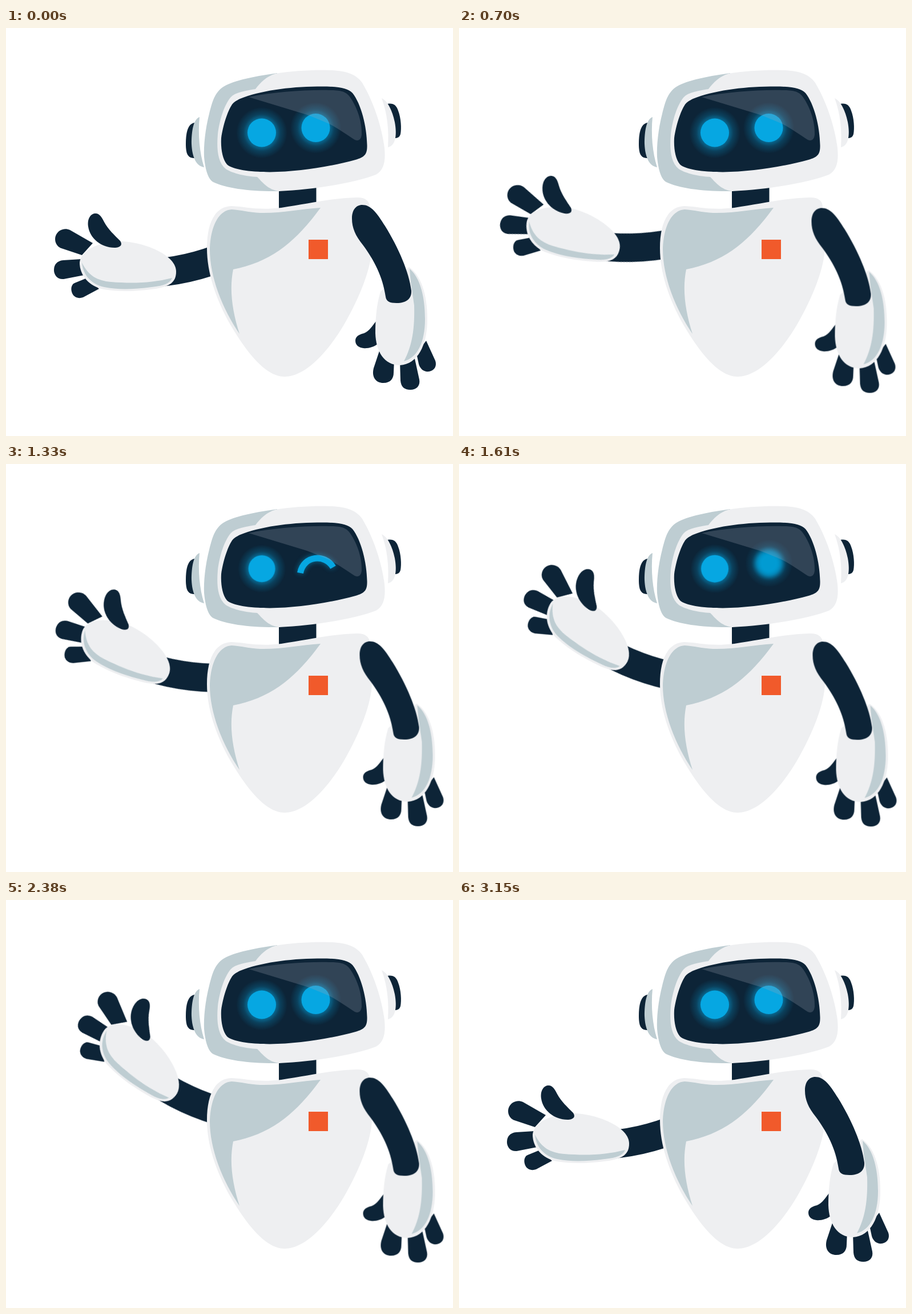
An HTML page without scripts that plays this animation: 783 px wide and 715 px high, repeating every 3220 ms.

```html
<!DOCTYPE html>
<html lang="en">
<head>
<meta charset="utf-8">
<title>Waving robot</title>
<style>
  html, body { margin: 0; width: 100%; height: 100%; overflow: hidden; background: #fff; }
  svg { display: block; width: 100vw; height: 100vh; }

  .dark { fill: #0d2437; }
  .light { fill: #eeeff1; }
  .grey { fill: #becdd2; }
  .glow { fill: url(#glow); }
  .eye { fill: #06a7e2; }
  .limb { fill: none; stroke: #0d2437; stroke-width: 50; }
  .smile { fill: none; stroke: #06a7e2; stroke-width: 11; }

  .wave, .sway, .open, .blur, .wink, .squint {
    animation: 3220ms -5ms infinite step-end;
  }
  .wave { animation-name: wave; transform-origin: 405px 418px; }
  .sway { animation-name: sway; }
  .open { animation-name: open; }
  .blur { animation-name: blur; }
  .wink { animation-name: wink; }
  .squint { animation-name: squint; transform-origin: 448px 183.5px; }

  /* the clock ticks every 70 ms: 46 ticks per loop */
  @keyframes wave {
    0% { transform: translate(0, 0) rotate(0deg); }
    15.217% { transform: translate(0, 0) rotate(0deg); animation-timing-function: steps(3); }
    21.739% { transform: translate(-17px, -18px) rotate(11.5deg); animation-timing-function: steps(3); }
    28.261% { transform: translate(-17px, -18px) rotate(29deg); animation-timing-function: steps(2); }
    32.609% { transform: translate(-17px, -18px) rotate(37.5deg); animation-timing-function: steps(4); }
    41.304% { transform: translate(-17px, -18px) rotate(22deg); animation-timing-function: steps(4); }
    50% { transform: translate(-17px, -18px) rotate(33.3deg); }
    52.174% { transform: translate(-17px, -18px) rotate(37.5deg); animation-timing-function: steps(4); }
    60.87% { transform: translate(-17px, -18px) rotate(21.9deg); animation-timing-function: steps(2); }
    65.217% { transform: translate(-17px, -18px) rotate(10deg); animation-timing-function: steps(4); }
    73.913% { transform: translate(-17px, -18px) rotate(37.5deg); animation-timing-function: steps(2); }
    78.261% { transform: translate(-17px, -18px) rotate(30deg); animation-timing-function: steps(3); }
    84.783% { transform: translate(-17px, -18px) rotate(10deg); animation-timing-function: steps(6); }
    97.826%, 100% { transform: translate(0, 0) rotate(0deg); }
  }
  @keyframes sway {
    0% { transform: translate(0, 0); }
    15.217% { transform: translate(0, 0); animation-timing-function: steps(3); }
    21.739% { transform: translate(11.5px, 5.5px); animation-timing-function: steps(5); }
    32.609% { transform: translate(13.5px, .3px); animation-timing-function: steps(8); }
    50% { transform: translate(13.5px, 1.3px); }
    78.261% { transform: translate(13.5px, 1.3px); animation-timing-function: steps(3); }
    84.783% { transform: translate(12px, 6px); animation-timing-function: steps(6); }
    97.826%, 100% { transform: translate(0, 0); }
  }
  @keyframes open {
    0%, 52.174%, 100% { opacity: 1; }
    26.087% { opacity: 0; }
  }
  @keyframes blur {
    0%, 28.261%, 52.174%, 100% { opacity: 0; }
    26.087%, 50% { opacity: 1; }
  }
  @keyframes wink {
    0%, 50%, 100% { opacity: 0; }
    28.261% { opacity: 1; }
  }
  @keyframes squint {
    0%, 52.174%, 100% { transform: scale(1); }
    26.087% { transform: scale(.94); }
    50% { transform: scale(.96); }
  }
</style>
</head>
<body>
<svg viewBox="0 0 783 715" preserveAspectRatio="none">
  <defs>
    <radialGradient id="glow">
      <stop offset=".5" stop-color="#06a7e2" stop-opacity=".6"/>
      <stop offset=".72" stop-color="#06a7e2" stop-opacity=".22"/>
      <stop offset="1" stop-color="#06a7e2" stop-opacity="0"/>
    </radialGradient>
    <filter id="soft" x="-50%" y="-50%" width="200%" height="200%">
      <feGaussianBlur stdDeviation="5"/>
    </filter>
  </defs>

  <!-- waving arm -->
  <g class="wave">
    <path class="limb" d="M260 429Q335 424 410 388"/>
    <path class="dark" d="M112 354L152 377L133 398L97 386C86 382 84 369 88 362C93 353 103 350 112 354Z"/>
    <path class="dark" d="M100 407L132 405L137 433L101 440C90 441 84 433 84 424C84 414 90 408 100 407Z"/>
    <path class="dark" d="M120 447L142 438L163 457L135 472C127 475 119 472 116 465C113 458 114 450 120 447Z"/>
    <path class="light" d="M129 411C131 390 160 374 205 374C248 377 298 399 298 427C298 446 286 453 262 457C235 461 200 463 171 458C146 453 129 434 129 411Z"/>
    <path class="grey" d="M133 411C144 434 160 443 184 445C222 448 256 447 291 438C288 447 276 452 255 454C225 458 195 459 172 454C150 449 135 434 133 411Z"/>
    <path class="dark" d="M144 348C142 333 149 325 157 325C164 325 168 332 172 340C179 353 190 363 200 373C204 379 202 384 192 385C168 386 147 369 144 348Z"/>
  </g>

  <!-- neck and body -->
  <path class="dark" d="M478 278H543.500V318H478Z"/>
  <path class="light" d="M352 386C352 345 364 313 395 312C420 313 440 320 482 315C530 308 570 298 615 297C630 297 637 303 637 314L641 385C640 420 620 472 592 520C565 566 525 611 488 611C452 611 418 562 393 520C367 474 352 428 352 386Z"/>
  <path class="grey" d="M551 315C515 317 482 325 445 324C425 323 412 319 395 318C370 320 358 352 357 388C357 436 379 492 409 536C396 495 391 458 398 423C465 410 508 374 551 315Z"/>
  <path fill="#f15a2b" d="M530 371H564V405H530Z"/>

  <!-- ears -->
  <path class="dark" d="M331 166C319 167 315 182 315 203C315 220 318 228 330 228Z"/>
  <path class="grey" d="M339 156C328 160 325 181 325 203C326 226 333 242 347 244C339 218 336 187 339 156Z"/>
  <path class="dark" d="M668 133C678 131 684 135 687 145C692 158 693 176 691 186C689 192 686 193 680 193Z"/>
  <path class="light" d="M658 123C668 127 677 145 681 165C685 187 683 206 669 209C671 179 668 150 658 123Z"/>

  <!-- head -->
  <path class="grey" d="M475 79C440 84 407 90 386 100C366 110 362 127 356 150C349 177 346 206 347 226C349 246 353 264 363 270C385 281 430 287 480 286Z"/>
  <path class="light" d="M472 80C500 75 540 73 567 74C598 75 614 82 624 96C643 128 658 171 663 210C665 232 663 248 648 257C615 270 545 283 478 286C459 283 451 272 440 261C421 260 397 255 385 247C370 235 369 210 371 186C374 161 382 136 393 122C402 112 420 110 437 107C446 95 456 85 472 80Z"/>
  <path class="dark" d="M410 124C445 110 495 103 545 102.500C582 102 598 105 607 114C622 133 632 172 632.500 205C633 222 628 226 612 231C568 243 512 252 462 252.500C425 252 397 248 387 239C379 229 376 211 377 193C380 171 388 146 396 134C400 129 404 127 410 124Z"/>

  <!-- eyes -->
  <g class="squint">
    <circle class="glow" cx="448" cy="183.500" r="45"/>
    <circle class="eye" cx="448" cy="183.500" r="25"/>
  </g>
  <g class="open">
    <circle class="glow" cx="542.500" cy="175" r="45"/>
    <circle class="eye" cx="542.500" cy="175" r="25"/>
  </g>
  <g class="blur" opacity="0">
    <circle class="glow" cx="543" cy="174" r="42" opacity=".7"/>
    <circle class="eye" cx="543" cy="174" r="23" filter="url(#soft)" opacity=".85"/>
  </g>
  <g class="wink" opacity="0">
    <path class="smile" filter="url(#soft)" opacity=".6" d="M515.500 191C521 160 559 157 573 181"/>
    <path class="smile" d="M515.500 191C521 160 559 157 573 181"/>
  </g>

  <!-- glass reflection -->
  <path fill="#a1a5b3" opacity=".25" d="M425 121C470 112 525 108 567 109C586 109 594 111 601 119C614 136 624 163 623 187C622 195 618 199 611 196C597 187 580 175 566 168C553 162 540 157 527 152Z"/>

  <!-- resting arm -->
  <g class="sway">
    <path class="dark" d="M612 548C612 540 619 537 627 535C637 531 642 521 649 513L652 553C645 559 634 562 626 561C618 560 612 556 612 548Z"/>
    <path class="dark" d="M655 563L644 596C640 612 648 622 661 622C674 622 679 614 679 604L680 580Z"/>
    <path class="dark" d="M690 583L691 618C692 629 698 634 708 634C719 634 726 627 724 616L715 575Z"/>
    <path class="dark" d="M719 570L723 589C726 599 733 603 741 602C751 600 755 592 752 583L736 548Z"/>
    <path class="light" d="M656 462C649 485 647 510 647 535C648 566 662 591 690 591C722 589 737 555 738 515C739 478 731 436 706 419Z"/>
    <path class="grey" d="M707 422C726 438 734 472 734 510C734 550 721 578 697 584C712 556 716 526 715 486L709 445Z"/>
    <path class="dark" d="M606 334C606 319 613 310 624 310C639 310 649 323 664 347C688 386 706 428 710 460C711 474 702 482 684 482C672 482 666 479 665 471C660 436 645 407 625 380C612 364 606 350 606 334Z"/>
  </g>
</svg>
</body>
</html>
```
